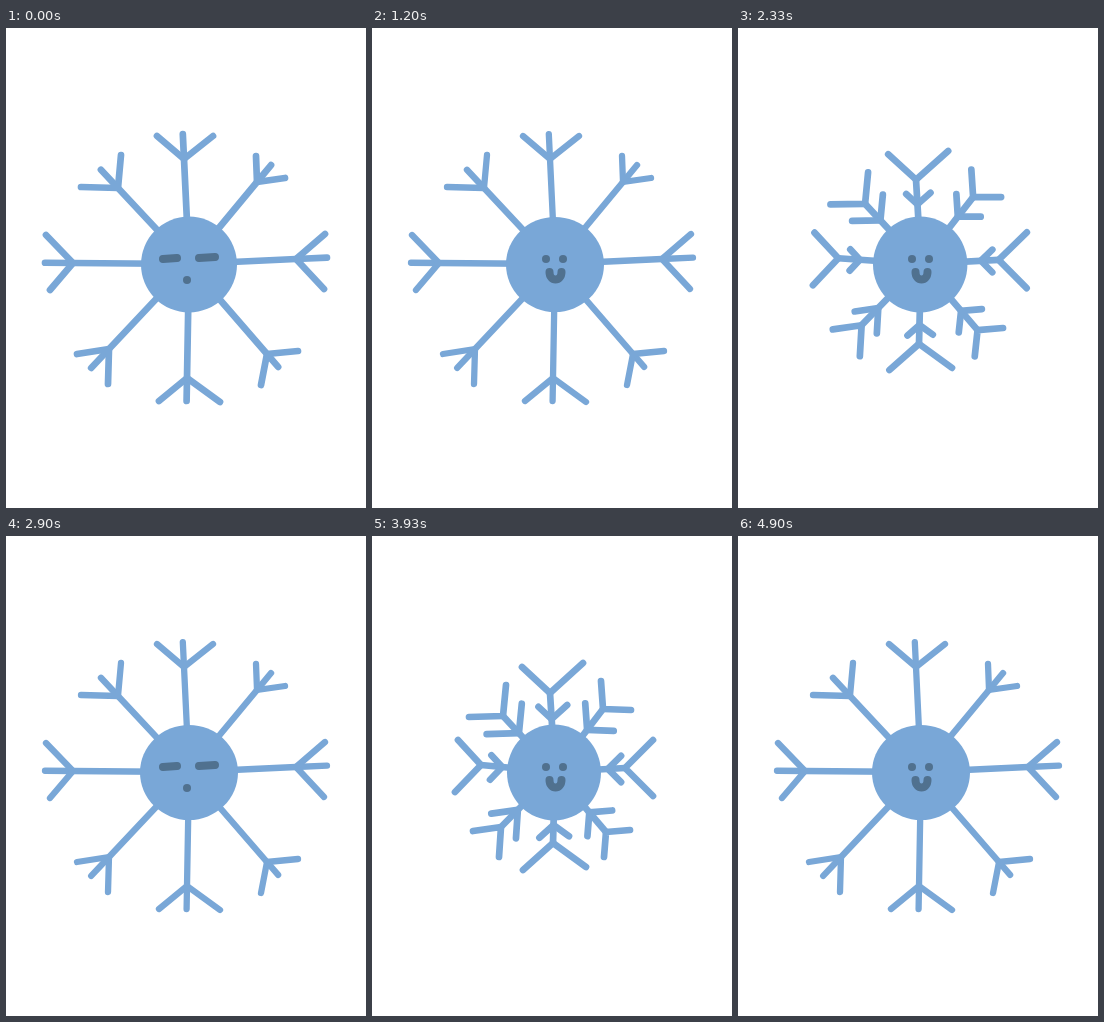
An HTML page with a canvas that plays this animation: 360x480 px, repeating every 5.07 s.

```html
<!DOCTYPE html>
<html>
<head>
<meta charset="utf-8">
<style>
  html, body { margin: 0; width: 100%; height: 100%; overflow: hidden; background: #fff; }
  canvas { display: block; }
</style>
</head>
<body>
<canvas id="stage" width="360" height="480"></canvas>
<script>
const ctx = document.getElementById('stage').getContext('2d');
const LOOP = 5070, POSES = 63, PER_PULSE = 21;
const BLUE = '#79a7d7', DARK = '#50718f';
const CENTER = [183, 236];

// Each arm: [fork, branch, branch] stretched out, the same pulled in, then tip length.
const ARMS = [
  [[178,131, 151,108, 207,108], [178,157, 150,131, 211,127], 25],
  [[251,154, 250,128, 279,150], [231,173, 229,145, 259,174], 22],
  [[290,231, 319,206, 318,261], [253,232, 281,204, 281,260], 31],
  [[261,326, 292,323, 255,357], [234,296, 258,294, 232,321], 17],
  [[181,350, 214,374, 153,373], [181,307, 214,331, 151,334], 23],
  [[103,321, 102,356, 71,326], [129,291, 127,321, 101,295], 26],
  [[67,235, 44,262, 40,207], [109,229, 83,256, 86,204], 28],
  [[112,160, 75,159, 115,127], [131,180, 97,181, 134,149], 25]
];

// Face keys: step, left eye line, right eye line, mouth ends and sag, line width.
const FACES = [
  [0, 157,231, 171,230, 193,230, 209,229, 181,252, 181,252, 0, 8],
  [2, 161,229, 170,233, 194,232, 206,229, 182,251, 186,252, 1, 7.5],
  [5, 168,231, 174,232, 192,232, 198,231, 179,246, 188,246, 5, 7.5],
  [7, 174,231, 174,231, 191,231, 191,231, 177.5,244, 189.5,244, 10, 8]
];

const mix = (a, b, k) => a + (b - a) * k;
const mixAll = (a, b, k) => a.map((v, i) => mix(v, b[i], k));

function line(...pts) {
  ctx.beginPath();
  for (let i = 0; i < pts.length; i += 2) ctx.lineTo(pts[i], pts[i + 1]);
  ctx.stroke();
}

function outward(x, y) {
  const dx = x - CENTER[0], dy = y - CENTER[1], d = Math.hypot(dx, dy);
  return [dx / d, dy / d];
}

function drawArm([far, near, tip], index, k) {
  const [x, y, ax, ay, bx, by] = mixAll(far, near, k);
  const [ux, uy] = outward(x, y);
  const stub = tip * Math.max(0, 1 - 3.5 * k);
  line(...CENTER, x, y, x + ux * stub, y + uy * stub);
  line(ax, ay, x, y, bx, by);
  if (!k) return;

  // The inner fork buds on the stem and slides towards the body.
  const full = Math.hypot(far[0] - CENTER[0], far[1] - CENTER[1]);
  const r = mix(mix(full, 48, .34), 53, k);
  const size = (index % 2 ? .95 : .47) * k ** .65;
  const ix = CENTER[0] + ux * r, iy = CENTER[1] + uy * r;
  line(ix + (ax - x) * size, iy + (ay - y) * size, ix, iy,
       ix + (bx - x) * size, iy + (by - y) * size);
}

function drawFace(step) {
  const i = Math.max(1, FACES.findIndex(f => f[0] >= step));
  const a = FACES[i - 1], b = FACES[i];
  const f = mixAll(a, b, (step - a[0]) / (b[0] - a[0]));
  const [x1, y1, x2, y2, sag, width] = f.slice(9);
  ctx.strokeStyle = DARK;
  ctx.lineWidth = width;
  line(...f.slice(1, 5));
  line(...f.slice(5, 9));
  ctx.beginPath();
  ctx.moveTo(x1, y1);
  ctx.bezierCurveTo(x1, y1 + sag, x2, y2 + sag, x2, y2);
  ctx.stroke();
}

// Face step: opens with each pulse, with an extra blink in the second rest.
function faceStep(pulse, i) {
  if (pulse === 1 && i > 13) return i === 14 ? 3 : i - 15;
  return Math.min(i, 7);
}

function draw(t) {
  const tick = Math.floor(t * .03 + .15);
  const pose = Math.min(POSES - 1, Math.floor((tick + .23) * POSES / 152));
  const pulse = Math.floor(pose / PER_PULSE), i = pose % PER_PULSE;
  const rest = i >= 13;
  const k = rest ? 0 : (Math.min(i, 14 - i) / 7) ** 1.5;
  const boil = rest && (i - 13 >> 1) % 2;

  ctx.fillStyle = '#fff';
  ctx.fillRect(0, 0, 360, 480);
  ctx.lineCap = ctx.lineJoin = 'round';
  ctx.strokeStyle = ctx.fillStyle = BLUE;
  ctx.lineWidth = boil ? 6.3 : 6.7;
  ARMS.forEach((arm, n) => drawArm(arm, n, k));
  ctx.beginPath();
  ctx.ellipse(183 - k, 236.5, boil ? 49 : 48 - k, boil ? 47.5 : 48, 0, 0, 7);
  ctx.fill();
  drawFace(faceStep(pulse, i));
}

const start = performance.now();
function loop() {
  draw((performance.now() - start) % LOOP);
  requestAnimationFrame(loop);
}
loop();
</script>
</body>
</html>
```
